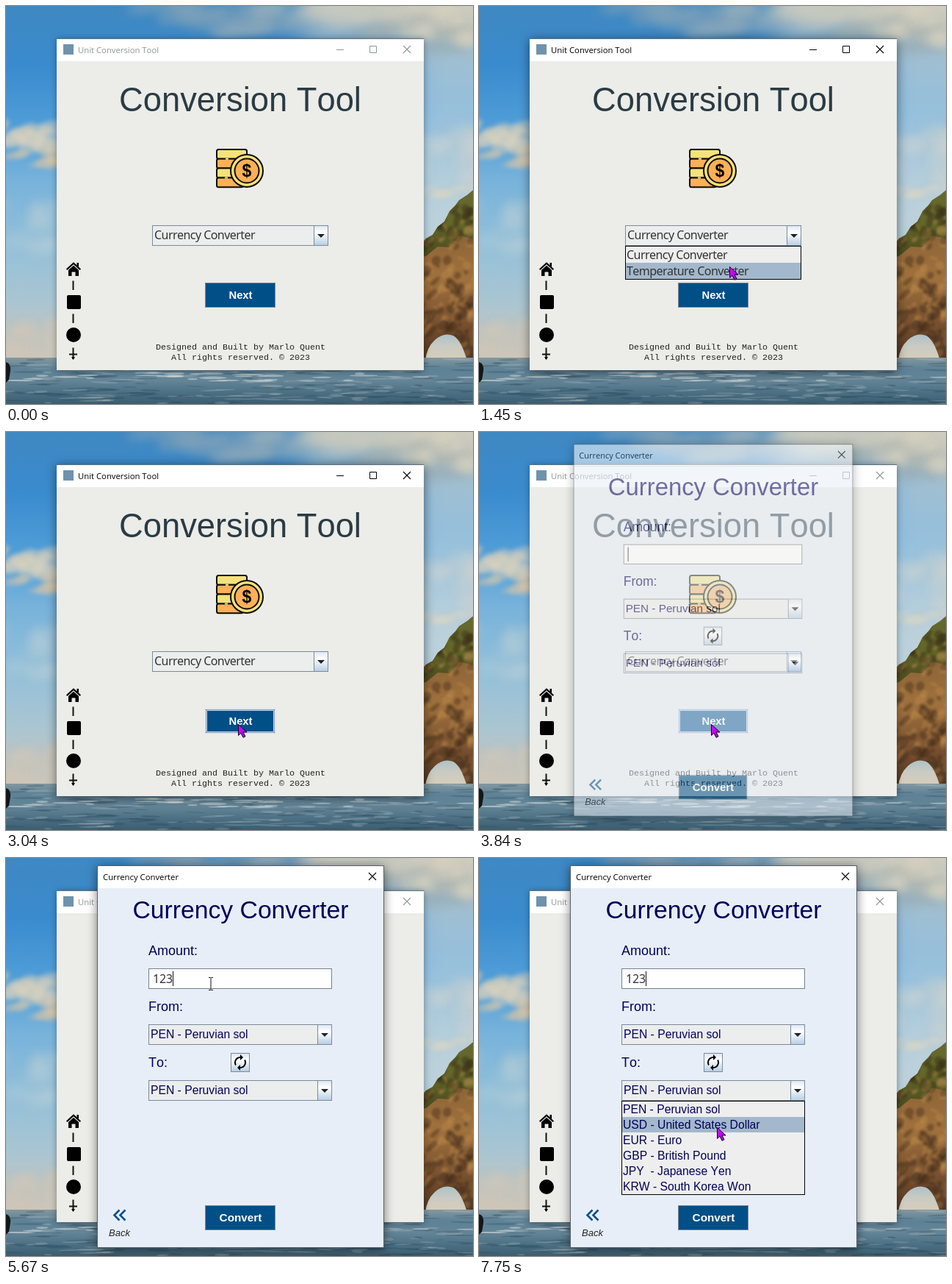
These frames come from a looping animation (636x541 px, 8000 ms). An HTML page with a canvas:

```html
<!DOCTYPE html>
<html lang="en">
<head>
<meta charset="utf-8">
<title>Unit Conversion Tool</title>
<style>
html, body { margin: 0; width: 100%; height: 100%; overflow: hidden; background: #6fa9d0; }
canvas, svg { position: absolute; left: 0; top: 0; width: 636px; height: 541px; display: block; }
text { font-kerning: none; white-space: pre; }
.arial { font-family: "Liberation Sans", Arial, sans-serif; }
.noto { font-family: "Noto Sans", "Open Sans", sans-serif; font-size: 16px; letter-spacing: -.55px; fill: #333; }
.open { font-family: "Open Sans", "Noto Sans", sans-serif; font-size: 11.3px; }
.mono { font-family: "Liberation Mono", "Courier New", monospace; font-size: 11.67px; fill: #222; }
.field { font-size: 18px; fill: #00005c; }
.item { font-size: 15.7px; fill: #000058; }
.press { font-weight: bold; fill: #fff; text-anchor: middle; }
.near { filter: drop-shadow(0 2px 7px rgba(0,0,0,.5)); }
.far { filter: drop-shadow(0 1px 4px rgba(0,0,0,.35)); }
</style>
</head>
<body>
<canvas id="scene" width="636" height="541"></canvas>
<svg id="ui" viewBox="0 0 636 541"></svg>
<script>
const LOOP = 8000;
const $ = id => document.getElementById(id);

// ---- landscape ----
function paintScene() {
  const c = $('scene').getContext('2d');
  let seed = 7;
  const rnd = () => (seed = (seed * 16807) % 2147483647) / 2147483647;
  const fade = (y0, y1, colors) => {
    const g = c.createLinearGradient(0, y0, 0, y1);
    colors.forEach((k, i) => g.addColorStop(i / (colors.length - 1), k));
    return g;
  };
  const blob = (x, y, rx, ry, tilt) => {
    c.beginPath();
    c.ellipse(x, y, rx, ry, tilt, 0, 7);
    c.fill();
  };
  const cloud = (x, y, w, h, color, n) => {
    c.fillStyle = color;
    for (let i = 0; i < n; i++)
      blob(x + (rnd() - .5) * w, y + (rnd() - .5) * h, w * (.08 + rnd() * .14), h * (.12 + rnd() * .14), -.15);
  };
  const shape = (d, fill) => { c.fillStyle = fill; c.fill(new Path2D(d)); };

  c.fillStyle = fade(0, 480, ['#3f88c2', '#3a8bce', '#4f9dd8', '#78b3db', '#92c0da', '#a9c5d2', '#cfc6b8']);
  c.fillRect(0, 0, 636, 480);
  // paler sky towards the right
  c.fillStyle = fade(0, 300, ['#b4bfbf', '#9fbfd3', '#93bfdd', '#b3cddb', '#bfd2da']);
  c.filter = 'blur(22px)';
  c.fillRect(400, -60, 300, 110);
  c.fillRect(548, -60, 150, 400);
  c.filter = 'blur(7px)';
  cloud(480, 10, 320, 52, 'rgba(207,204,190,.42)', 30);
  cloud(560, 40, 170, 40, 'rgba(146,164,172,.32)', 14);
  cloud(600, 22, 100, 50, 'rgba(220,213,194,.45)', 16);
  cloud(270, 14, 230, 42, 'rgba(140,168,184,.4)', 16);
  cloud(610, 210, 100, 70, 'rgba(214,216,206,.35)', 14);
  cloud(20, 300, 110, 60, 'rgba(190,208,216,.3)', 12);
  cloud(30, 450, 120, 40, 'rgba(214,200,180,.45)', 12);
  c.filter = 'blur(3px)';
  cloud(25, 178, 100, 40, 'rgba(222,211,190,.5)', 20);
  cloud(45, 207, 80, 22, 'rgba(222,200,168,.5)', 14);
  cloud(600, 252, 90, 18, 'rgba(222,214,196,.4)', 12);

  const ridge = 'M560 330L572 316L581 311L588 300L597 293L604 279L612 271L617 264L628 257L640 247';
  c.filter = 'blur(.6px)';
  shape(ridge + 'V490H560Z', fade(250, 490, ['#6f522c', '#8d6437', '#a0713d', '#7a5130', '#46301f']));
  c.save();
  c.clip(new Path2D(ridge + 'V490H560Z'));
  shape(ridge + 'V318L618 312L604 328L588 327L572 340L560 342Z', fade(250, 340, ['#66682f', '#646729', '#4b4a20']));
  c.filter = 'blur(1.5px)';
  for (let i = 0; i < 130; i++) {
    c.fillStyle = i % 2 ? 'rgba(44,30,18,.34)' : 'rgba(205,150,84,.28)';
    blob(565 + rnd() * 75, 275 + rnd() * 200, 2 + rnd() * 5, 2 + rnd() * 9, .3 + rnd() * .8);
  }
  c.restore();
  c.filter = 'blur(.6px)';
  shape('M571 482Q573 464 584 454Q596 443 609 448Q620 454 628 482Z', fade(444, 482, ['#a9c0c8', '#cbcbc2', '#d8cdb9']));

  c.fillStyle = fade(477, 541, ['#8699a0', '#5d8196', '#648597', '#4c7084', '#3c5d70']);
  c.fillRect(0, 478, 636, 63);
  for (let i = 0; i < 230; i++) {
    const y = 480 + rnd() * 61;
    c.fillStyle = i % 2 ? 'rgba(28,54,72,.24)' : 'rgba(196,204,204,.26)';
    blob(rnd() * 636, y, 5 + rnd() * 20, .5 + rnd() * 1.2, (rnd() - .5) * .1);
  }
  c.fillStyle = 'rgba(220,226,224,.5)';
  for (let i = 0; i < 30; i++) blob(rnd() * 636, 498 + rnd() * 12, 6 + rnd() * 20, .8 + rnd(), 0);
  shape('M0 484Q7 486 6 496L4 508L0 512Z', '#14171a');
}

// ---- drawing helpers ----
const rect = (x, y, w, h, fill, extra = '') => `<rect x="${x}" y="${y}" width="${w}" height="${h}" fill="${fill}" ${extra}/>`;
const frame = (x, y, w, h, edge, fill) => rect(x, y, w, h, edge) + rect(x + 1, y + 1, w - 2, h - 2, fill);
const text = (x, y, cls, str, extra = '') => `<text x="${x}" y="${y}" class="${cls}" ${extra}>${str}</text>`;
const line = (d, color, w = 1, extra = '') => `<path d="${d}" fill="none" stroke="${color}" stroke-width="${w}" ${extra}/>`;
const group = (id, body) => `<g id="${id}">${body}</g>`;
const cross = (x, y) => line(`M${x - 5} ${y - 5}l10 10m0 -10l-10 10`, 'currentColor', 1.1);

function combo(x, y, w, cls, label, dx, base) {
  const b = x + w - 20;
  return frame(x, y, w, 28, '#7a8a99', '#eceded') +
    rect(b, y + 1, 19, 26, 'url(#steel)') + rect(b, y + 1, 1, 26, '#7a8a99') +
    `<path d="M${b + 5} ${y + 12}h10l-5 5z" fill="#222"/>` + text(x + dx, base, cls, label);
}

function list(x, y, w, step, rows, cls, dx, dy) {
  return frame(x, y, w, rows.length * step + 2, '#000', '#eee') +
    rect(x + 1, y + 1, w - 2, step, '#a3b8cc', `id="bar${x}"`) +
    rows.map((r, i) => text(x + dx, y + dy + i * step, cls, r)).join('');
}

const button = (y, label, size) => frame(271, y, 96, 34, '#7a8a99', '#004f87') +
  text(319.5, y + 22, 'arial press', label, `font-size="${size}"`);

function coins() {
  const stack = ['#f6e27a', '#fcb057', '#f6e27a', '#fcb057'].map((f, i) =>
    `<rect x="287" y="${195 + i * 12.8}" width="${i ? 36 : 41}" height="12.8" rx="2.5" fill="${f}" stroke="#0b0b0b" stroke-width="2"/>`).join('');
  return stack + line('M299 207.8h4M298 233.4h4', '#f6e27a', 2) +
    '<circle cx="328" cy="224" r="22" fill="#f6e07a" stroke="#0b0b0b" stroke-width="2"/>' +
    '<circle cx="328" cy="224" r="16.5" fill="#fcb057" stroke="#0b0b0b" stroke-width="2"/>' +
    text(328, 232, 'arial', '$', 'font-size="23" font-weight="bold" text-anchor="middle"');
}

const house = line('M82.700 358.300L92 349.800L101.300 358.300', '#000', 2.2) +
  '<path d="M85 359L92 352.700L99 359V367H94.500V361.500H89.500V367H85ZM96.500 349H99V355L96.500 352.800Z"/>';
const sideBar = house +
  line('M91.500 373.500V386M91.500 418.500V431M91.500 464.500V480M86 473.500H97', '#111', 2) +
  '<path d="M89 477h5l-2.500 4z"/>' +
  rect(83, 393, 19, 19, '#000', 'rx="2"') + '<circle cx="92" cy="447" r="10"/>';

const mainWindow = rect(69, 44, 500, 451, '#5f7480', 'id="shade"') +
  rect(69, 45, 500, 30, '#fff') + rect(69, 75, 500, 420, '#ecece8') +
  rect(78, 52, 14, 14, '#6f93ad') +
  group('bar', text(98, 64, 'open', 'Unit Conversion Tool', 'fill="currentColor"') +
    line('M450 59.500h10M495.500 54.500h9v9h-9z', 'currentColor') + cross(546, 59)) +
  text(319, 143, 'arial', 'Conversion Tool', 'font-size="45.3" fill="#2a3b44" text-anchor="middle"') +
  coins() + combo(199, 298, 240, 'noto', 'Currency Converter', 3, 317) +
  button(376, 'Next', 14.8) +
  group('focus', line('M271.500 376.500h95v33h-95z', '#dde3e8') +
    line('M272.500 377.500h93v31h-93z', '#8b9fbd') + line('M273.500 378.500h91v29h-91z', '#c3d5ea')) +
  sideBar +
  text(319.5, 467, 'mono', 'Designed and Built by Marlo Quent', 'text-anchor="middle"') +
  text(319.5, 481, 'mono', 'All rights reserved. © 2023', 'text-anchor="middle"');

const swapIcon = '<path transform="translate(307 266)" d="M12 6v3l4-4-4-4v3c-4.420 0-8 3.580-8 8 0 1.570.46 3.030 1.240 4.260L6.700 14.800c-.45-.83-.7-1.790-.7-2.800 0-3.310 2.690-6 6-6zm6.760 1.740L17.300 9.200c.44.84.7 1.790.7 2.800 0 3.310-2.690 6-6 6v-3l-4 4 4 4v-3c4.420 0 8-3.580 8-8 0-1.570-.46-3.030-1.240-4.260z"/>';

const dialog = rect(124, 10, 391, 520, '#56616b', 'class="near"') +
  rect(125, 11, 389, 30, '#fff') + rect(125, 41, 389, 488, '#e8eef7') +
  text(132, 30, 'open', 'Currency Converter') + `<g color="#000">${cross(499, 25)}</g>` +
  text(319.5, 82, 'arial', 'Currency Converter', 'font-size="33.7" fill="#00005c" text-anchor="middle"') +
  text(194, 132, 'arial field', 'Amount:') + text(194, 208, 'arial field', 'From:') + text(194, 284, 'arial field', 'To:') +
  frame(194, 150, 250, 28, '#75828e', '#fff') +
  text(200, 170, 'noto', '', 'id="amount" style="letter-spacing:-.1px"') +
  rect(200, 154, 1, 20, '#111', 'id="caret"') +
  combo(194, 226, 250, 'arial item', 'PEN - Peruvian sol', 3, 245) +
  frame(306, 265, 26, 26, '#7a8a99', 'url(#steel)') + swapIcon +
  combo(194, 302, 250, 'arial item', 'PEN - Peruvian sol', 3, 321) +
  line('M154.500 478.500l-7 7l7 7M162.500 478.500l-7 7l7 7', '#064f88', 2.6) +
  text(140, 514, 'arial', 'Back', 'font-size="13" font-style="italic" fill="#222"') +
  button(472, 'Convert', 15.3);

const currencies = ['PEN - Peruvian sol', 'USD - United States Dollar', 'EUR - Euro',
  'GBP - British Pound', 'JPY  - Japanese Yen', 'KRW - South Korea Won'];

$('ui').innerHTML =
  `<defs><linearGradient id="steel" x2="0" y2="1"><stop stop-color="#dde8f3"/><stop offset=".35" stop-color="#fff"/>
   <stop offset="1" stop-color="#b8cfe5"/></linearGradient>
   <linearGradient id="violet" x2="1" y2="1"><stop stop-color="#e010ff"/><stop offset="1" stop-color="#9400d8"/></linearGradient></defs>` +
  mainWindow +
  group('menu', list(199, 326, 240, 22, ['Currency Converter', 'Temperature Converter'], 'noto', 2, 18)) +
  group('dialog', dialog) +
  group('choices', list(194, 330, 250, 21, currencies, 'arial item', 2, 17)) +
  '<circle id="halo" r="12" fill="#f6e21c" opacity=".75"/>' +
  group('arrow', '<path d="M.5.5V15.500L4 12.300L7 18.300L10 16.800L7 11H12Z" fill="url(#violet)" stroke="#1c0028" stroke-width="1"/>') +
  group('beam', line('M-3 -8.500h2.500q.5 0 .5 1v15q0 1 -.5 1h-2.500M3 -8.500h-2.500M3 8.500h-2.500', '#111'));

// ---- timing ----
// start, end, steps, control point, end point
const moves = [
  [70, 710, 10, 270, 250, 314, 314],
  [1160, 1450, 5, 330, 330, 341, 354],
  [1850, 1980, 3, 336, 342, 325, 340],
  [2640, 2710, 2, 316, 372, 312, 408],
  [2970, 3040, 2, 313, 402, 316, 397],
  [4250, 4580, 6, 322, 330, 279, 171],
  [5940, 6680, 11, 350, 230, 317, 309],
  [7080, 7420, 6, 326, 345, 325, 382],
  [7620, 7750, 3, 325, 374, 324, 366]
];
const clicks = [[910, 980], [2310, 2390], [3640, 3770], [5050, 5120], [6750, 6820]];
const caretFlips = [4320, 4780, 5320, 5470, 6160, 6680, 7150, 7690];
const keys = [5470, 5570, 5670];
// time, opacity, scale
const opening = [[3770, .2, .955], [3840, .55, .974], [3910, .84, .989], [3980, .96, .997], [4050, 1, 1]];

const within = (t, a, b) => t >= a && t < b;
const passed = (t, times) => times.filter(k => t >= k).length;

function pointer(t) {
  let x = 579, y = 488;
  for (const [a, b, n, cx, cy, ex, ey] of moves) {
    if (t < a) break;
    const k = Math.min(n, Math.floor((t - a) / ((b - a) / (n - 1)) + 1.02));
    const p = k / n, u = p * p * (3 - 2 * p), v = 1 - u;
    x = v * v * x + 2 * u * v * cx + u * u * ex;
    y = v * v * y + 2 * u * v * cy + u * u * ey;
  }
  return [Math.round(x), Math.round(y)];
}

const show = (id, on) => $(id).setAttribute('visibility', on ? 'visible' : 'hidden');
const place = (id, x, y) => $(id).setAttribute('transform', `translate(${x} ${y})`);

function draw(t) {
  const [x, y] = pointer(t);
  const active = within(t, 910, 3640);
  $('shade').setAttribute('class', active ? 'near' : 'far');
  $('bar').setAttribute('color', active ? '#000' : '#8d9896');
  show('focus', t >= 2710);

  show('menu', within(t, 910, 2390));
  $('bar199').setAttribute('y', y >= 349 ? 349 : 327);
  show('choices', t >= 6750);
  $('bar194').setAttribute('y', 331 + 21 * Math.max(0, Math.floor((y - 331) / 21)));

  const open = opening.filter(o => t >= o[0]).pop();
  $('dialog').setAttribute('display', open ? 'inline' : 'none');
  if (open) {
    const [, alpha, s] = open;
    $('dialog').setAttribute('opacity', alpha);
    $('dialog').setAttribute('transform', s < 1 ? `translate(319 269.500) scale(${s}) translate(-319.500 -270)` : '');
  }

  const typed = passed(t, keys);
  $('amount').textContent = '123'.slice(0, typed);
  $('caret').setAttribute('x', 200 + typed * 9);
  $('caret').setAttribute('opacity', passed(t, caretFlips) % 2 ? 0 : 1);

  const inField = t > 4050 && y > 150 && y < 179;
  show('arrow', t >= 70 && !inField);
  show('beam', inField);
  show('halo', clicks.some(c => within(t, ...c)));
  ['arrow', 'beam', 'halo'].forEach(id => place(id, x, y));
}

paintScene();
const begin = performance.now();
function tick() {
  draw((performance.now() - begin) % LOOP);
  requestAnimationFrame(tick);
}
tick();
</script>
</body>
</html>
```
